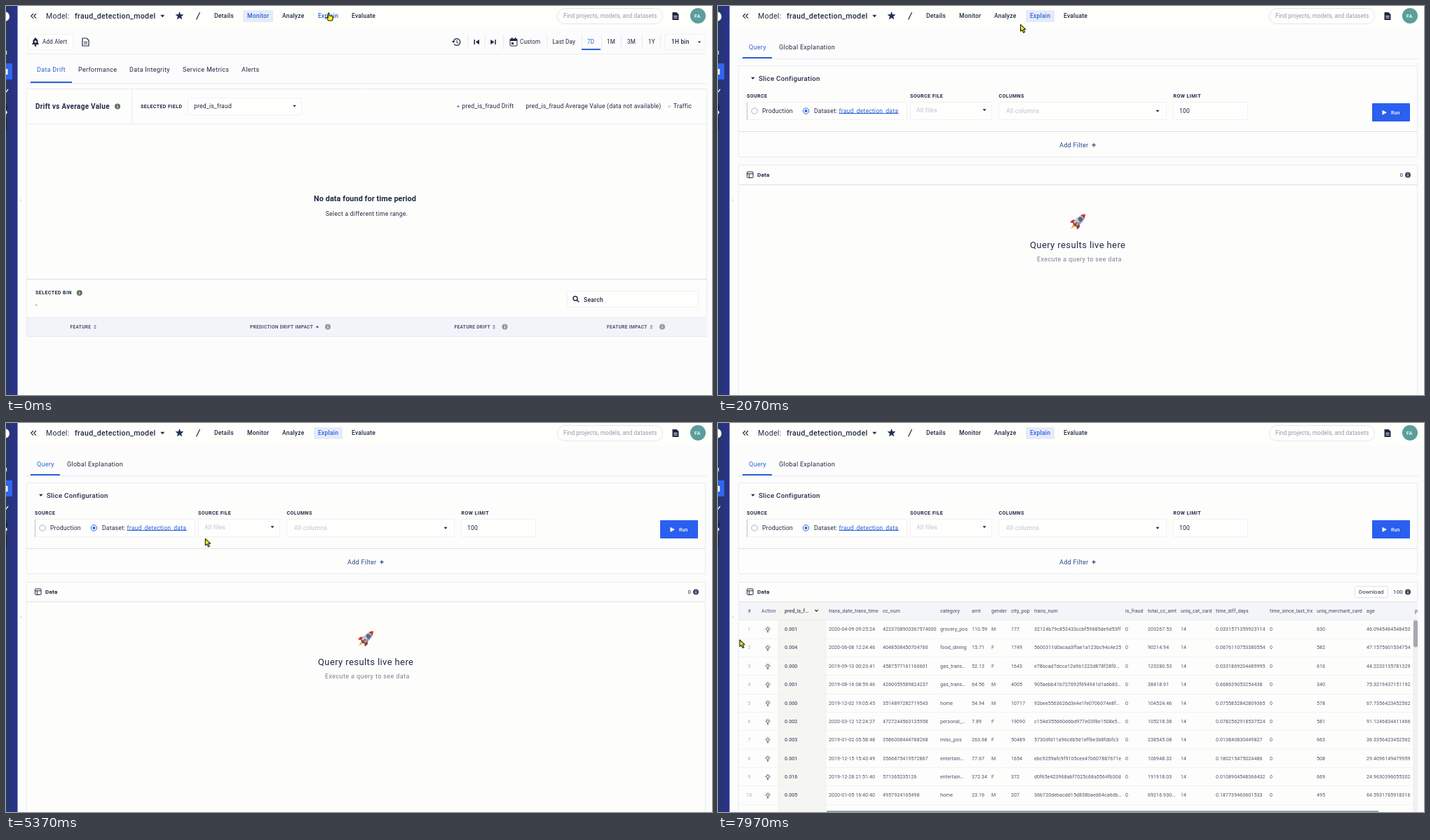
An HTML page with a canvas for the animation above (8 s loop, 1007x556 px).

```html
<!DOCTYPE html>
<html lang="en">
<head>
<meta charset="utf-8">
<title>Model monitor</title>
<style>
html, body { margin: 0; width: 100%; height: 100%; overflow: hidden; background: #fcfcfc; }
canvas { display: block; width: 1007px; height: 556px; }
</style>
</head>
<body>
<canvas id="stage"></canvas>
<script>
const W = 1007, H = 556, LOOP = 8000;
const canvas = document.getElementById('stage');
const g = canvas.getContext('2d');
const dpr = window.devicePixelRatio || 1;
canvas.width = W * dpr;
canvas.height = H * dpr;

const INK = '#1f2a44', BLUE = '#2a62d8', NAVY = '#22335c', MUTE = '#a9afbd',
      LINE = '#e9ebf3', FAINT = '#f0f1f7', CARD = '#fdfdfc', PAGE = '#fcfcfc', TINT = '#e6ebfa';

// weight, size, letter spacing
const NAV = [500, 8.5, .22], TAB = [400, 9, .3], BODY = [400, 8.6, .2], SMALL = [400, 8.2, .14],
      LABEL = [700, 7, .45], HEAD = [700, 6.5, .35], CELL = [400, 7, .1], CELL_BOLD = [500, 7, .1];

function text(s, x, y, style, color = INK) {
  const [weight, size, gap] = style;
  g.font = `${weight} ${size}px Roboto, sans-serif`;
  g.letterSpacing = gap + 'px';
  g.fillStyle = color;
  g.fillText(s, x, Math.round(y + size * .36));
}
function box(x, y, w, h, fill, stroke, r = 0) {
  g.beginPath();
  g.roundRect(x, y, w, h, r);
  if (fill) { g.fillStyle = fill; g.fill(); }
  if (stroke) { g.strokeStyle = stroke; g.lineWidth = 1; g.stroke(); }
}
function disc(x, y, r, fill, stroke, width = 1) {
  g.beginPath();
  g.arc(x, y, r, 0, Math.PI * 2);
  if (fill) { g.fillStyle = fill; g.fill(); }
  if (stroke) { g.strokeStyle = stroke; g.lineWidth = width; g.stroke(); }
}
function path(points, fill, stroke, width = 1) {
  g.beginPath();
  for (let i = 0; i < points.length; i += 2) g.lineTo(points[i], points[i + 1]);
  if (fill) { g.closePath(); g.fillStyle = fill; g.fill(); }
  if (stroke) { g.strokeStyle = stroke; g.lineWidth = width; g.stroke(); }
}
const hline = (x, y, w, c = LINE) => box(x, y, w, 1, c);
const vline = (x, y, h, c = LINE) => box(x, y, 1, h, c);
const caret = (x, y, r = 2.5, c = INK) => path([x - r, y - r / 2, x + r, y - r / 2, x, y + r / 2 + .5], c);

function info(x, y, c = '#5b7462') {
  disc(x, y, 4, c);
  box(x - .5, y - .6, 1, 2.8, '#fff');
  box(x - .5, y - 2.3, 1, 1, '#fff');
}
function sorter(x, y) {
  path([x - 2, y - .8, x + 2, y - .8, x, y - 2.8], '#66708a');
  path([x - 2, y + .8, x + 2, y + .8, x, y + 2.8], '#66708a');
}
function sheet(x, y) {
  path([x, y, x + 6, y, x + 9, y + 3, x + 9, y + 11, x, y + 11], INK);
  hline(x + 2, y + 5, 5, '#fff');
  hline(x + 2, y + 7.5, 5, '#fff');
}
function star(x, y, r) {
  const p = [];
  for (let i = 0; i < 10; i++) {
    const a = i * Math.PI / 5 - Math.PI / 2, d = i % 2 ? r * .43 : r;
    p.push(x + d * Math.cos(a), y + d * Math.sin(a));
  }
  path(p, NAVY);
}
function lens(x, y) {
  disc(x, y, 3, null, INK, 1.4);
  path([x + 2, y + 2, x + 5.2, y + 5.2], null, INK, 1.6);
}

function sidebar() {
  const shade = g.createLinearGradient(0, 0, 16, 0);
  shade.addColorStop(0, '#25366b');
  shade.addColorStop(1, '#2b318f');
  box(0, 0, 16.5, H, shade);
  disc(-2, 15, 7, '#fff');
  text('t', -1, 66, [700, 8, 0], '#fff');
  box(-3, 82, 12, 23, '#2f66ee', null, 1);
  box(0, 90, 2.5, 8, '#fff');
  path([-1, 122, 0, 123, 3, 119], null, '#fff', 1.3);
  path([0, 137, 2, 145, 0, 153], '#11183a');
  path([0, 149, 2, 152, 0, 155], '#fff');
  box(0, 160, 1, 18, '#11183a');
  text('›', 20, 277.5, [400, 8, 0], MUTE);
}

function header(active, hover) {
  box(16, 0, W, 32, '#fefefb');
  for (const x of [39, 43]) path([x, 11, x - 3.2, 14.3, x, 17.6], null, INK, 1.2);
  text('Model:', 57, 14, [400, 10.5, .3]);
  text('fraud_detection_model', 98, 14, [500, 10.6, .32]);
  caret(223.2, 14.3, 3);
  star(247.5, 14.2, 6.3);
  path([271.5, 19.5, 276.5, 9], null, INK, 1.2);
  const tabs = { Details: 297, Monitor: 344, Analyze: 394, Explain: 445, Evaluate: 493 };
  for (const [name, x] of Object.entries(tabs)) {
    if (name === active) box(x - 6, 6, name === 'Monitor' ? 43 : 41, 17, TINT, null, 1);
    text(name, x, 14.2, NAV, name === active || name === hover ? BLUE : INK);
  }
  box(786.5, 3.5, 150, 22, '#fefefd', '#e4e6ec', 11);
  text('Find projects, models, and datasets', 795, 14.2, [400, 8.2, .13], '#9298a6');
  sheet(950.5, 9);
  disc(987, 14, 11, '#5b9e9b');
  text('FA', 981.8, 14.2, [500, 7.5, .2], '#fff');
}

function tabBar(tabs, y, base, w) {
  hline(29, base, 970);
  tabs.forEach(([name, x], i) => text(name, x, y, TAB, i ? INK : BLUE));
  box(35, base - 2, w, 2, BLUE);
}

function toolbar() {
  hline(29, 68, 970);
  box(31.5, 40.5, 64, 22, '#fefefd', FAINT, 2);
  path([37, 55, 38.5, 52, 38.5, 49, 40.5, 46.5, 42, 45, 43.5, 46.5, 45.5, 49, 45.5, 52, 47, 55], INK);
  disc(42, 56.5, 1.4, INK);
  path([40, 51, 44, 51], null, '#fff');
  path([42, 49, 42, 53], null, '#fff');
  text('Add Alert', 52, 51, SMALL);
  path([109, 46, 115, 46, 118, 49, 118, 57, 109, 57, 109, 46], null, INK, 1.2);
  path([111, 51.5, 116, 51.5], null, INK);
  path([111, 54, 116, 54], null, INK);
  g.beginPath();
  g.arc(643, 51.5, 4.8, -2.9, 2.5);
  g.strokeStyle = INK; g.lineWidth = 1.3; g.stroke();
  path([636, 50, 640.5, 50, 638.3, 53], INK);
  path([643, 48.8, 643, 52, 645.3, 53.3], null, INK);
  for (const x of [659, 683, 709, 771, 821, 849, 877, 907, 933]) vline(x, 41, 21);
  box(667.5, 48, 1.5, 7, INK);
  path([675, 48, 675, 55, 669.8, 51.5], INK);
  box(697.3, 48, 1.5, 7, INK);
  path([691.2, 48, 691.2, 55, 696.5, 51.5], INK);
  box(719, 47, 10, 10, null, INK, 1);
  box(719, 47, 10, 3, INK);
  box(721, 45, 1.3, 2, INK);
  box(726, 45, 1.3, 2, INK);
  box(721, 52, 3, 3, INK);
  text('Custom', 733, 51, SMALL);
  text('Last Day', 779.5, 51, SMALL);
  text('7D', 829, 51, SMALL, BLUE);
  text('1M', 857, 51, SMALL);
  text('3M', 886, 51, SMALL);
  text('1Y', 916, 51, SMALL);
  box(821, 61, 27, 2, BLUE);
  box(939.5, 40.5, 58, 22, null, FAINT, 2);
  text('1H bin', 949, 51, [500, 8.4, .2]);
  caret(989, 51.5, 2.2);
}

function monitorPage() {
  toolbar();
  tabBar([['Data Drift', 44], ['Performance', 103], ['Data Integrity', 176],
          ['Service Metrics', 252], ['Alerts', 336]], 91.2, 110, 59);
  box(29.5, 118.5, 970, 354, CARD, LINE);
  text('Drift vs Average Value', 42, 143.5, [700, 10, .28]);
  info(159, 143.5);
  vline(179, 119, 49);
  text('SELECTED FIELD', 192, 143, LABEL);
  box(259.5, 131.5, 162, 24, '#fefefd', FAINT, 2);
  text('pred_is_fraud', 268, 142.5, BODY);
  caret(411.5, 142.8, 2.3);
  disc(645, 143.5, 1.8, '#7f9fe8');
  text('pred_is_fraud Drift', 650.5, 143.2, BODY);
  text('pred_is_fraud Average Value (data not available)', 741.5, 143.2, BODY);
  disc(946, 143.5, 1.8, '#c9d3e4');
  text('Traffic', 952, 143.2, BODY);
  hline(30, 168, 970);
  text('No data found for time period', 439, 275.5, [700, 10.9, .05]);
  text('Select a different time range.', 456, 296.5, [400, 8.5, .28]);
  hline(30, 390, 970, '#d9dce6');
  text('SELECTED BIN', 42, 409.7, LABEL);
  info(104.8, 410);
  text('-', 42, 427, BODY);
  box(800.5, 407.5, 187, 23, '#fefefd', FAINT, 2);
  lens(812, 418);
  text('Search', 824, 419.5, [500, 8.6, .2]);
  box(30, 446, 970, 27, '#f3f4fa');
  hline(30, 445, 970);
  hline(30, 472, 970);
  [['FEATURE', 91.5, 127], ['PREDICTION DRIFT IMPACT', 348, 444, 459], ['FEATURE DRIFT', 639.5, 696, 711.5],
   ['FEATURE IMPACT', 857, 920.5, 936]].forEach(([name, x, sx, ix], i) => {
    text(name, x, 458.8, HEAD, '#4a5470');
    if (i === 1) path([sx - 2, 459.5, sx + 2, 459.5, sx, 457], INK);
    else sorter(sx, 458.7);
    if (ix) info(ix, 458.5, '#939b96');
  });
}

function rocket(x, y) {
  g.save();
  g.translate(x, y);
  g.rotate(Math.PI / 4);
  path([-2.5, 7, 0, 15, 2.5, 7], '#f39a2b');
  path([-1.3, 7, 0, 12, 1.3, 7], '#f9d34c');
  path([-3, 0, -7.5, 5, -7, 10, -2.5, 6.5], '#c8352f');
  path([3, 0, 7.5, 5, 7, 10, 2.5, 6.5], '#a92a28');
  g.beginPath();
  g.moveTo(0, -14);
  g.bezierCurveTo(6, -8, 5.5, 2, 3, 8);
  g.lineTo(-3, 8);
  g.bezierCurveTo(-5.5, 2, -6, -8, 0, -14);
  g.fillStyle = '#c3cad3';
  g.fill();
  g.save();
  g.clip();
  box(-8, -15, 16, 6.5, '#d03a35');
  box(1.5, -8.5, 5, 17, '#8c96a5');
  box(-8, 6, 16, 3, '#4d5666');
  g.restore();
  disc(0, -4, 2.4, '#3b78b8', '#47505f');
  box(-.8, 2, 1.6, 7, '#b32f2c');
  g.restore();
}

function queryForm(hover, press) {
  tabBar([['Query', 44], ['Global Explanation', 87]], 59.2, 75, 42);
  box(29.5, 85.5, 968, 130, CARD, LINE);
  caret(49.8, 103.2, 2.7);
  text('Slice Configuration', 58, 103.2, [500, 9.6, .3]);
  text('SOURCE', 41, 128.5, LABEL);
  text('SOURCE FILE', 274, 128.5, LABEL);
  text('COLUMNS', 400.5, 128.5, LABEL);
  text('ROW LIMIT', 649.5, 128.5, LABEL);
  for (const [x, w] of [[41.5, 228], [274.5, 116], [400.5, 239], [649.5, 106]])
    box(x, 137.5, w, 25, '#fefefd', FAINT, 1);
  vline(41, 138, 25, '#b9bfd0');
  disc(52, 150, 4.2, '#fff', '#a9b1c6');
  text('Production', 63, 149.7, BODY);
  disc(125.5, 150, 4.2, '#fff', BLUE);
  disc(125.5, 150, 2.1, BLUE);
  text('Dataset:', 137, 149.7, BODY);
  text('fraud_detection_data', 172.5, 149.7, BODY, BLUE);
  hline(172.5, 153, 85, BLUE);
  text('All files', 283, 149, BODY, '#bcc1cc');
  caret(380, 148.5, 2.5);
  text('All columns', 411, 149.8, BODY, '#bcc1cc');
  caret(627, 150, 2.5);
  text('100', 658, 149.7, BODY);
  box(933, 139, 54, 26, hover ? '#1d4fd0' : '#2a5ff0', null, 1);
  if (press) box(944, 140, 20, 16, 'rgba(128,150,178,.65)', null, 4);
  path([947.5, 148.7, 947.5, 155.7, 954, 152.2], '#fff');
  text('Run', 960, 152.2, [500, 7, .15], '#fff');
  hline(30, 179, 968, '#dfe2ec');
  text('Add Filter', 487, 198.5, TAB, '#26458c');
  path([533.3, 198.7, 538.7, 198.7], null, '#26458c', 1.2);
  path([536, 196, 536, 201.4], null, '#26458c', 1.2);
}

const COLS = [['pred_is_f…', 95], ['trans_date_trans_time', 158], ['cc_num', 235], ['category', 317],
  ['amt', 362], ['gender', 390], ['city_pop', 418], ['trans_num', 451], ['is_fraud', 581],
  ['total_cc_amt', 613], ['uniq_cat_card', 660], ['time_diff_days', 710],
  ['time_since_last_trx', 787], ['uniq_merchant_card', 854], ['age', 925], ['p', 994]];
const ROWS = [
  '0.001|2020-04-09 09:25:24|4223708903367574000|grocery_pos|110.59|M|177|32124b79c853433ccbf59685de9d53ff|203267.53|0.0331571359923114|630|46.0945464548453',
  '0.004|2020-06-08 12:24:46|4048508450704760|food_dining|15.71|F|1749|5600311d0acaa3ffae1a123bc94c4e25|90214.94|0.0676110753380554|582|47.1575601534754',
  '0.000|2019-09-10 00:23:41|4587577161160601|gas_trans…|52.13|F|1643|e78bcad7dcca12a9b1222d878f28f0…|123280.53|0.0331869204489995|616|44.2233135781329',
  '0.001|2019-08-16 08:59:46|4260059589824237|gas_trans…|64.56|M|4005|905aebb41b727692f694941d1a6b83…|38418.91|0.668639053254438|340|75.3219437151192',
  '0.000|2019-12-02 19:05:45|3514897282719543|home|54.94|M|10717|92bee5563626d3e4e1fe0706074e8f…|104524.46|0.0755852842809365|578|67.7356423452562',
  '0.002|2020-03-12 12:24:27|4727244563135958|personal_…|7.89|F|19090|c154d355660d6bd977e03f8e1508e5…|105218.38|0.0782562918537524|581|91.1246834411466',
  '0.003|2019-01-02 05:58:48|3586008444788268|misc_pos|263.68|F|50489|5730dfd11a96c6b5d1eff6e3b8fdbfc3|238545.08|0.013840830449827|663|36.3356423452562',
  '0.001|2019-12-15 15:43:49|3566875419572867|entertain…|77.67|M|1654|ebc9259afc9f9105cee47b607887671e|106948.32|0.180215475024486|508|29.4096149479959',
  '0.016|2019-12-28 21:51:40|571365235126|entertain…|372.34|F|372|d0f65e423968abf7025c68a5564fb30d|191918.03|0.0108904548366432|669|24.9630396055302',
  '0.005|2020-01-05 16:40:40|4957924165498|home|23.16|M|207|36b720debacdd15d838baed64ca6db…|69216.930…|0.187739463601533|495|64.5931765918316'
].map(s => {
  const c = s.split('|');
  return [...c.slice(0, 8), '0', c[8], '14', c[9], '0', c[10], c[11]];
});

function actionIcon(x, y) {
  disc(x, y - .8, 2, '#fff', '#4c5570');
  path([x - 1.2, y + 3, x + 1.2, y + 3], null, '#4c5570', 1.4);
  for (let i = 0; i < 5; i++) {
    const a = Math.PI * (1 + i / 4), c = Math.cos(a), s = Math.sin(a);
    path([x + 3.2 * c, y - .8 + 3.2 * s, x + 4.3 * c, y - .8 + 4.3 * s], null, '#6b7388', .8);
  }
}

function dataTable() {
  g.save();
  g.beginPath();
  g.rect(30, 255, 968, 301);
  g.clip();
  box(30, 256, 968, 25, '#f4f5f9');
  box(85, 256, 70, 300, '#f5f5f2');
  hline(30, 281, 968);
  text('#', 42.5, 268, CELL, '#4a5470');
  text('Action', 62, 268, CELL, '#4a5470');
  COLS.forEach(([name, x], k) => text(name, x, 268, k ? CELL : CELL_BOLD, '#3d4763'));
  path([138.3, 267, 140.5, 269.2, 142.7, 267], null, INK, 1.1);
  ROWS.forEach((row, i) => {
    const y = 294.6 + 26.36 * i;
    hline(30, Math.round(y + 13), 968, '#f1f2f6');
    text(String(i + 1), i < 9 ? 42.5 : 40.5, y, CELL, MUTE);
    actionIcon(71, y + .8);
    row.forEach((cell, k) => text(cell, COLS[k][1], y, k ? CELL : CELL_BOLD, '#4b546c'));
  });
  box(991, 282, 7, 274, '#f1f1f3');
  box(992, 282, 6, 38.5, '#a6a8af', null, 3);
  box(155, 554.3, 787, 1.7, '#8f959c');
  g.restore();
}

function explainPage(t) {
  queryForm(t >= 5880 && t < 7260, t >= 6080 && t < 6230);
  box(29.5, 227.5, 968, 340, CARD, LINE);
  hline(30, 255, 968, '#dfe2ec');
  box(41.5, 237, 8.5, 8.5, null, INK, 1);
  path([41.5, 239.8, 50, 239.8], null, INK);
  path([44.3, 240, 44.3, 245.5], null, INK);
  text('Data', 56, 241.3, [700, 8.1, .25]);
  info(984, 241.5, '#3c4868');
  if (t >= 6400) {
    box(908.5, 233.5, 47, 16, '#fefefd', '#dfe2ea', 2);
    text('Download', 914, 241.3, [400, 7.8, .1]);
    text('100', 963, 241.3, [400, 8, .15]);
    dataTable();
  } else {
    text('0', 972.5, 241.3, [400, 8, 0]);
    rocket(514, 307.5);
    text('Query results live here', 445, 341, [400, 13, .4]);
    text('Execute a query to see data', 455, 361.8, [400, 9, .4], '#7b8190');
  }
}

function statusBar() {
  box(-2, 548, 323.5, 10, '#abcad3', '#7f9da8', 1);
  text('g for api-js.mixpanel.com…', 0, 554.3, [400, 7.6, .1], '#3d4f58');
}

// time, x, y of the pointer tip
const TRACK = [[0, 460, 10], [1930, 460, 10], [2630, 190, 167], [2970, 190, 167], [3170, 182, 162],
  [3770, 170, 160], [4430, 147, 132], [4630, 147, 132], [5070, 262, 166], [5300, 262, 166],
  [5960, 954, 147], [7230, 954, 147], [7430, 240, 314], [7730, 240, 314], [7960, 31, 310], [8000, 31, 310]];

function pointerAt(t) {
  const i = Math.max(1, TRACK.findIndex(k => k[0] > t));
  const [t0, x0, y0] = TRACK[i - 1], [t1, x1, y1] = TRACK[i];
  const u = Math.min(1, (t - t0) / (t1 - t0)), e = u * u * (3 - 2 * u);
  return [x0 + (x1 - x0) * e, y0 + (y1 - y0) * e];
}

function pointer(t) {
  const [x, y] = pointerAt(t);
  const onTab = x > 440 && x < 478 && y < 24, onRun = x > 934 && y > 139 && y < 165;
  g.save();
  g.translate(x, y);
  g.lineJoin = 'round';
  const shape = onTab || onRun
    ? [-.5, 0, 1, 0, 1.3, 4, 4, 4, 6.5, 5.5, 6.3, 8.5, 5, 11, 0, 11, -3, 7, -2.2, 6, -.6, 7, -.5, 0]
    : [0, 0, 0, 9.5, 2.3, 7.6, 4.2, 11.6, 6, 10.7, 4.2, 7, 7.2, 6.8, 0, 0];
  path(shape, '#f4ee27', '#24240f', 1.1);
  g.restore();
}

function draw(t) {
  g.setTransform(dpr, 0, 0, dpr, 0, 0);
  box(0, 0, W, H, PAGE);
  header(t >= 60 ? 'Explain' : 'Monitor', 'Explain');
  if (t >= 200) explainPage(t);
  else monitorPage();
  sidebar();
  if (t >= 200 && t < 1100) statusBar();
  pointer(t);
}

const start = performance.now();
function tick() {
  draw((performance.now() - start) % LOOP);
  requestAnimationFrame(tick);
}
tick();
</script>
</body>
</html>
```
